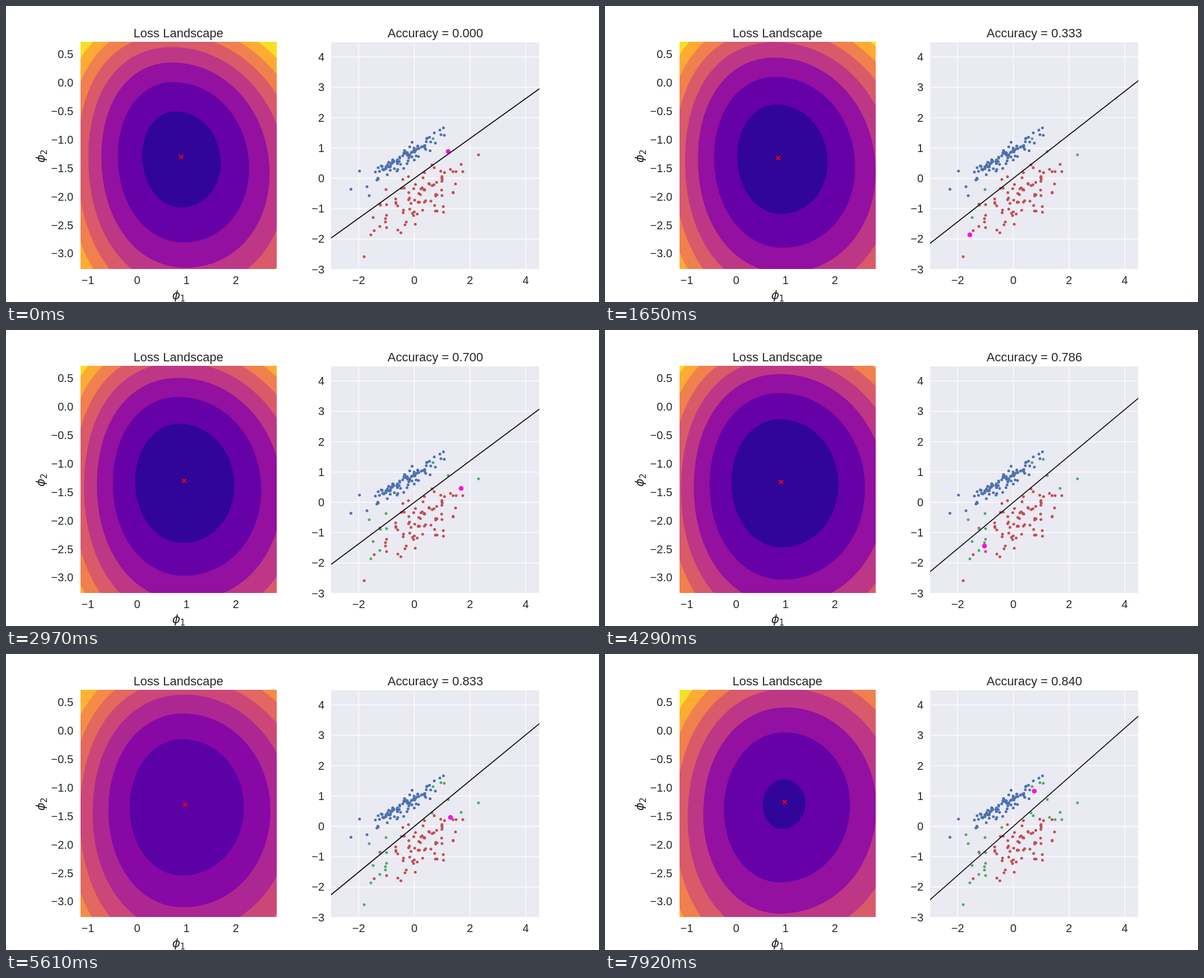
Recreate the animation shown at these times as an HTML page with a canvas. Size 1058 by 529 pixels, loop 8000 ms.

```html
<!DOCTYPE html>
<html lang="en">
<head>
<meta charset="utf-8">
<title>Loss landscape</title>
<style>
html, body { margin: 0; width: 100%; height: 100%; overflow: hidden; background: #fff; }
canvas { display: block; }
</style>
</head>
<body>
<canvas id="stage" width="1058" height="529"></canvas>
<script>
const ctx = document.getElementById('stage').getContext('2d');
const LOOP = 8000, STEP = 330, LAST = 24;
const SANS = '"Liberation Sans", Arial, sans-serif';
const MATH = '"DejaVu Sans", sans-serif';
const INK = '#262626', BLUE = '#4c72b0', RED = '#c44e52', GREEN = '#55a868';
const LEFT = { x: 133, y: 64, w: 350, h: 406 };
const RIGHT = { x: 580, y: 65, w: 371.5, h: 405.5 };

// Pixel position of data values on the four axes.
const lossX = v => 234 + v * 88;
const lossY = v => 137 - v * 101.8;
const dataX = v => 728.5 + v * 49.7;
const dataY = v => 308 - v * 54.2;

const EIGHT_BANDS = ['#310597', '#6600a7', '#9310a1', '#bd3786', '#da5a6a', '#f0804e', '#fdab33', '#f6e025'];
const NINE_BANDS = ['#2d0594', '#5c01a6', '#8808a6', '#ad2793', '#cc4778', '#e3685f', '#f58b47', '#fdb32f'];

// Model at a few steps: step, slope of the boundary, cross x, cross y.
const MODELS = [
  [0, .7175, 312.5, 269.5], [5, .7825, 309, 271.5], [9, .7466, 318, 269.5], [13, .834, 314, 271.5],
  [17, .823, 319.5, 269.5], [21, .8004, 323, 260.5], [24, .883, 320.5, 264.5]
];

// Points in the order they get labelled.
const LABELLED = [
  [762, 237], [789, 260], [843, 266], [678, 328], [668, 356], [655, 378], [651, 409],
  [648, 339], [667, 394], [679, 355], [812, 283], [782, 231], [679, 374], [677, 380],
  [677, 386], [639, 448], [776, 230], [760, 284], [793, 292], [644, 323], [708, 310],
  [679, 396], [764, 289], [803, 296], [815, 296], [766, 245]
];

const isBlue = ([x, y]) => y + .55 * x < 697;

let seed = 11;
function random() {
  seed = (seed * 16807) % 2147483647;
  return seed / 2147483647;
}
const bell = () => (random() + random() + random() - 1.5) * 2;

// Sloping cloud of points that stays on its side of the class border.
function cloud(count, blue, cx, cy, spreadX, spreadY, slope) {
  const points = [];
  while (points.length < count) {
    const dx = bell() * spreadX;
    const point = [cx + dx, cy + slope * dx + bell() * spreadY];
    if (isBlue(point) === blue) points.push(point);
  }
  return points;
}
const bluePoints = cloud(88, true, 705, 273, 31, 8, -.58);
const redPoints = cloud(76, false, 748, 338, 36, 24, -.5).filter(([, y]) => y > 293);

function modelAt(step) {
  const i = Math.max(1, MODELS.findIndex(model => model[0] >= step));
  const a = MODELS[i - 1], b = MODELS[i];
  const u = (step - a[0]) / (b[0] - a[0]);
  const [, slope, x, y] = a.map((value, j) => value + (b[j] - value) * u);
  return { slope, x, y };
}

function labelledRight(step) {
  const misses = step < 6 ? 1 + Math.ceil(step / 2) : step < 18 ? 3 : 4;
  return step + 1 - misses;
}

function clipTo(box, colour) {
  ctx.beginPath();
  ctx.rect(box.x, box.y, box.w, box.h);
  ctx.clip();
  ctx.fillStyle = colour;
  ctx.fill();
}

function text(str, x, y, align = 'center', font = '20px ' + SANS) {
  ctx.font = font;
  ctx.textAlign = align;
  ctx.fillStyle = INK;
  ctx.fillText(str, x, y);
}

function segment(x1, y1, x2, y2, colour, width) {
  ctx.strokeStyle = colour;
  ctx.lineWidth = width;
  ctx.beginPath();
  ctx.moveTo(x1, y1);
  ctx.lineTo(x2, y2);
  ctx.stroke();
}

function dot([x, y], colour, r = 2.5) {
  ctx.fillStyle = colour;
  ctx.beginPath();
  ctx.arc(x, y, r, 0, Math.PI * 2);
  ctx.fill();
}

// Egg-shaped contour: squared radii grow linearly with level and step.
function contour(level, step, colour) {
  const n = level - 1;
  const w2 = 4900 + 323 * step + (8800 + 100 * step) * n;
  const h2 = 7396 + 440 * step + (13100 + 121 * step) * n;
  if (w2 <= 0 || h2 <= 0) return;
  const hw = Math.sqrt(w2), hh = Math.sqrt(h2);
  const cx = 313 + .75 * step - .011 * step * step + (3.6 + .06 * step) * n;
  const cy = 274 + (5.2 + .02 * step) * n;
  const tilt = .08 - .0048 * step;
  const top = [cx - hw * (tilt + .08), cy - hh];
  const right = [cx + hw, cy + hh * tilt];
  const bottom = [cx + hw * (tilt - .08), cy + hh];
  const left = [cx - hw, cy - hh * tilt];
  const quarter = (from, to, horizontal, bulge) => {
    const sx = (to[0] - from[0]) * bulge, sy = (to[1] - from[1]) * bulge;
    if (horizontal) ctx.bezierCurveTo(from[0] + sx, from[1], to[0], to[1] - sy, ...to);
    else ctx.bezierCurveTo(from[0], from[1] + sy, to[0] - sx, to[1], ...to);
  };
  ctx.beginPath();
  ctx.moveTo(...top);
  quarter(top, right, true, .555);
  quarter(right, bottom, false, .55 + .01 * level);
  quarter(bottom, left, true, .55 + .01 * level);
  quarter(left, top, false, .54 + .02 * level);
  ctx.fillStyle = colour;
  ctx.fill();
}

function drawLandscape(step, model) {
  const bands = step >= 15 && step <= 22 ? NINE_BANDS : EIGHT_BANDS;
  const lowest = step >= 15 ? 0 : 1;
  const { x, y } = model, r = 3.5;
  ctx.save();
  clipTo(LEFT, bands[7]);
  for (let i = 6; i >= 0; i--) contour(i + lowest, step, bands[i]);
  segment(x - r, y - r, x + r, y + r, '#f00', 2);
  segment(x - r, y + r, x + r, y - r, '#f00', 2);
  ctx.restore();
}

function drawScatter(step, model) {
  ctx.save();
  clipTo(RIGHT, '#eaeaf2');
  for (let v = -2; v <= 4; v += 2) segment(dataX(v), 65, dataX(v), 471, '#fff', 1.3);
  for (let v = -3; v <= 4; v++) segment(580, dataY(v), 952, dataY(v), '#fff', 1.3);
  bluePoints.forEach(point => dot(point, BLUE));
  redPoints.forEach(point => dot(point, RED));
  LABELLED.forEach((point, i) => dot(point, i <= step ? GREEN : isBlue(point) ? BLUE : RED));
  dot(LABELLED[step + 1], '#ff0cf0', 4.3);
  dot(LABELLED[step + 1], '#ee14d4', 1.8);
  const lineY = x => dataY(0) - model.slope * (x - dataX(0));
  segment(578, lineY(578), 954, lineY(954), '#111', 1.8);
  ctx.restore();
}

function phi(sub, x, y, angle) {
  ctx.save();
  ctx.translate(x, y);
  ctx.rotate(angle);
  text('\u03d5', 0, 0, 'left', 'italic 22px ' + MATH);
  text(sub, 14, 3.5, 'left', '15px ' + MATH);
  ctx.restore();
}

const label = (v, digits = 0) => (v < 0 ? '\u2212' : '') + Math.abs(v).toFixed(digits);

function drawLabels(step) {
  const title = '22px ' + SANS;
  const accuracy = labelledRight(step) / (step + 1);
  text('Loss Landscape', 307.5, 56, 'center', title);
  text('Accuracy = ' + accuracy.toFixed(3), 766, 56, 'center', title);
  for (let v = -1; v <= 2; v++) text(label(v), lossX(v), 497);
  for (let v = .5; v >= -3; v -= .5) text(label(v, 1), 120, lossY(v) + 7, 'right');
  for (let v = -2; v <= 4; v += 2) text(label(v), dataX(v), 497);
  for (let v = -3; v <= 4; v++) text(label(v), 568, dataY(v) + 7, 'right');
  phi('1', 296.5, 524, 0);
  phi('2', 69, 280, -Math.PI / 2);
}

function draw() {
  const step = Math.min(LAST, Math.floor(performance.now() % LOOP / STEP));
  const model = modelAt(step);
  ctx.fillStyle = '#fff';
  ctx.fillRect(0, 0, 1058, 529);
  drawLandscape(step, model);
  drawScatter(step, model);
  drawLabels(step);
  requestAnimationFrame(draw);
}
draw();
</script>
</body>
</html>
```
